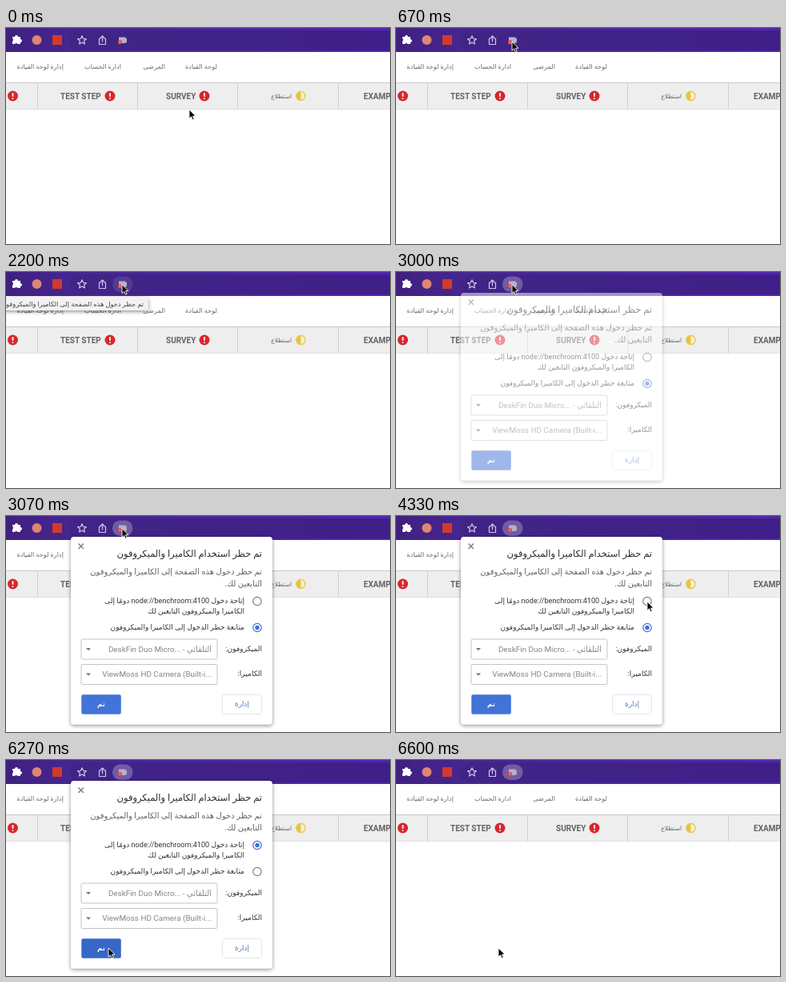
Recreate the animation shown at these times as an HTML page. Size 480 px wide and 270 px high, loop 6670 ms.

```html
<!DOCTYPE html>
<html lang="ar">
<head>
<meta charset="utf-8">
<style>
  html, body { margin: 0; width: 100%; height: 100%; overflow: hidden; background: #fff; }
  svg { display: block; width: 100vw; height: 100vh; }
  text { font: 9px Roboto, "DejaVu Sans", sans-serif; fill: #5f6368; }
  .rtl { direction: rtl; }
  .nav text { font-size: 8.2px; fill: #6a6a6a; }
  .tabs text { font-size: 10px; font-weight: 700; fill: #646464; }
  .tabs .rtl { font-size: 7.5px; font-weight: 400; }
  .title text { font-size: 11.5px; fill: #2b2c30; }
  .body text { font-size: 10px; }
  .dark text { font-size: 9.1px; fill: #35363a; }
  .choice text { font-size: 9.9px; fill: #858585; }
  .line { fill: none; stroke: #cfc4ec; stroke-width: 1.2; stroke-linejoin: round; stroke-linecap: round; }
  .box { fill: #fff; stroke: #c4c4c4; }
</style>
</head>
<body>
<svg viewBox="0 0 480 270">
  <defs>
    <linearGradient id="bar">
      <stop offset="0" stop-color="#40207e"/>
      <stop offset=".17" stop-color="#462690"/>
      <stop offset=".5" stop-color="#4c259f"/>
      <stop offset="1" stop-color="#5623b4"/>
    </linearGradient>
    <linearGradient id="field">
      <stop offset="0" stop-color="#402586"/>
      <stop offset="1" stop-color="#3f1f88"/>
    </linearGradient>
    <filter id="shadow" x="-10%" y="-20%" width="120%" height="150%">
      <feDropShadow dx="0" dy="1.5" stdDeviation="2.8" flood-opacity=".45"/>
    </filter>
    <g id="alert">
      <circle r="6.5" fill="#d9262c"/>
      <path d="M0-3.8V.8M0 2.6V4" stroke="#fff" stroke-width="1.8"/>
    </g>
  </defs>

  <rect width="480" height="270" fill="#fff"/>

  <!-- browser toolbar -->
  <rect width="480" height="30" fill="url(#bar)"/>
  <rect x="79" y="3" width="430" height="25" rx="12.5" fill="url(#field)"/>
  <path fill="#fff" d="M8 11h3a2 2 0 1 1 4 0h3v3a2 2 0 1 1 0 4v2h-3.5a2 2 0 0 0-3.5 0H8v-3.5a2 2 0 0 0 0-3.5z"/>
  <circle cx="38.5" cy="15" r="6" fill="#df8574"/>
  <rect x="58" y="9" width="12" height="12" fill="#d23a2c"/>
  <path class="line" d="M95 9.8l1.6 3.5 3.8.4-2.9 2.5.9 3.7-3.4-2-3.4 2 .9-3.7-2.9-2.5 3.8-.4z"/>
  <path class="line" d="M118.500 13h-2v7.500h8V13h-2M120.500 17V10m-2 2 2-2 2 2"/>
  <rect id="hover" x="133" y="5.5" width="25.5" height="19.5" rx="9.75" fill="#fff"/>
  <path fill="#b9b0c8" d="M141 11.500h8.500v2l1.500-1v6l-1.500-1v1.500H141z"/>
  <rect x="140" y="15.500" width="4.800" height="4.800" rx=".8" fill="#d63a42"/>
  <path d="M141.200 16.700l2.400 2.400m0-2.400-2.400 2.400" stroke="#f3d5da" stroke-width=".6"/>

  <!-- page navigation -->
  <g class="nav">
    <text class="rtl" x="264" y="51">لوحة القيادة</text>
    <text class="rtl" x="199" y="51">المرضى</text>
    <text class="rtl" x="144" y="51">ادارة الحساب</text>
    <text class="rtl" x="72" y="51">إدارة لوحة القيادة</text>
  </g>

  <!-- step tabs -->
  <g class="tabs">
    <rect y="68" width="480" height="34" fill="#eee"/>
    <path d="M0 68.5H480" stroke="#c8c8c8"/>
    <path d="M0 101.5H480" stroke="#e2e2e2"/>
    <path d="M39.5 69V102M164.5 69V102M289.5 69V102M415.5 69V102" stroke="#d0d0d0"/>
    <use href="#alert" x="8.5" y="85"/>
    <use href="#alert" x="130" y="85"/>
    <use href="#alert" x="248" y="85"/>
    <text x="68" y="88.5">TEST STEP</text>
    <text x="200" y="88.5">SURVEY</text>
    <text class="rtl" x="357" y="88">استطلاع</text>
    <text x="447" y="88.5">EXAMPLE</text>
    <circle cx="368.5" cy="85" r="5.6" fill="#f6eed2" stroke="#e8c33f" stroke-width="1.2"/>
    <path d="M368.5 79.4a5.6 5.6 0 0 0 0 11.2z" fill="#e8c33f"/>
  </g>

  <g id="tooltip">
    <rect x="-10" y="31" width="188" height="17" rx="4" fill="#f3f1f4" filter="url(#shadow)"/>
    <text class="rtl" x="172" y="43" style="font-size:8.3px;fill:#444">تم حظر دخول هذه الصفحة إلى الكاميرا والميكروفون</text>
  </g>

  <g id="popup">
    <rect x="81" y="26" width="252" height="234.5" rx="4" fill="#fff" filter="url(#shadow)"/>
    <path d="M90.5 34.5l6.500 6.500m0-6.500-6.500 6.500" stroke="#6f7378" stroke-width="1.2"/>
    <g class="title">
      <text class="rtl" x="320" y="51">تم حظر استخدام الكاميرا والميكروفون</text>
    </g>
    <g class="body">
      <text class="rtl" x="320" y="73">تم حظر دخول هذه الصفحة إلى الكاميرا والميكروفون</text>
      <text class="rtl" x="320" y="88">التابعين لك.</text>
    </g>
    <g class="dark">
      <text class="rtl" x="298" y="109">إتاحة دخول node://benchroom:4100 دومًا إلى</text>
      <text class="rtl" x="298" y="121.5">الكاميرا والميكروفون التابعين لك</text>
      <text class="rtl" x="298" y="142">متابعة حظر الدخول إلى الكاميرا والميكروفون</text>
      <text class="rtl" x="320" y="169">الميكروفون:</text>
      <text class="rtl" x="320" y="200">الكاميرا:</text>
    </g>
    <g class="radio"><circle cx="314" cy="106.5" r="5.2" fill="#fff"/><circle cx="314" cy="106.5" r="2.7"/></g>
    <g class="radio"><circle cx="314" cy="139.5" r="5.2" fill="#fff"/><circle cx="314" cy="139.5" r="2.7"/></g>
    <rect class="box" x="94" y="154" width="170" height="25" rx="1.5"/>
    <rect class="box" x="94" y="185.5" width="170" height="25" rx="1.5"/>
    <path d="M100 165h6l-3 3.3zM100 196.5h6l-3 3.3z" fill="#74777b"/>
    <g class="choice">
      <text class="rtl" x="257" y="169.5">التلقائي - DeskFin Duo Micro...&lrm;</text>
      <text x="257" y="201" text-anchor="end">ViewMoss HD Camera (Built-i...</text>
    </g>
    <rect id="done" x="94.3" y="223.3" width="49.5" height="24.5" rx="2"/>
    <text x="119" y="238" text-anchor="middle" style="font-size:8.5px;font-weight:700;fill:#fff">تم</text>
    <rect x="270.5" y="223.5" width="49" height="24" rx="2" fill="#fff" stroke="#e4e6ea"/>
    <text x="295" y="238" text-anchor="middle" style="fill:#5578c4">إدارة</text>
  </g>

  <path id="cursor" d="M0 0V11.2L2.6 8.8 4.3 12.7 6.2 11.9 4.5 8.1H8z" fill="#000" stroke="#fff" stroke-width=".9" stroke-linejoin="round"/>
</svg>

<script>
  const LOOP = 6670, TICKS_PER_MS = 0.015;
  const byId = id => document.getElementById(id);
  const [hover, tooltip, popup, done, cursor] =
    ['hover', 'tooltip', 'popup', 'done', 'cursor'].map(byId);
  const radios = [...document.querySelectorAll('.radio')];

  // Cursor stops: tick, x, y
  const stops = [
    [0, 229, 102], [10, 145, 17], [11, 145, 17], [14, 145, 15.5],
    [52, 145, 15.5], [59, 307, 101], [60, 307, 101], [65, 314, 107],
    [69, 314, 107], [74, 150, 229], [75, 150, 229], [76, 144, 234],
    [81, 128, 235], [101, 128, 235]
  ];

  const clamp = v => Math.max(0, Math.min(1, v));
  const ease = v => v * v * (3 - 2 * v);

  function cursorAt(tick) {
    const i = stops.findIndex(stop => stop[0] > tick);
    const [t0, x0, y0] = stops[i - 1], [t1, x1, y1] = stops[i];
    const k = ease((tick - t0) / (t1 - t0));
    return [x0 + (x1 - x0) * k, y0 + (y1 - y0) * k];
  }

  function setRadio(group, on) {
    const [ring, dot] = group.children;
    ring.setAttribute('stroke', on ? '#3f70d8' : '#7c7f84');
    ring.setAttribute('stroke-width', 1.2);
    dot.setAttribute('fill', on ? '#3f70d8' : 'none');
  }

  function draw(now) {
    const tick = Math.floor((now % LOOP) * TICKS_PER_MS + 0.1);
    const allowed = tick >= 68;
    hover.setAttribute('opacity', tick >= 45 ? 0.26 : 0.1 * clamp((tick - 11) / 3));
    tooltip.setAttribute('opacity', clamp((tick - 30) / 3) * clamp((42 - tick) / 3));
    popup.setAttribute('opacity', tick < 99 ? clamp((tick - 44) / 2) : 0);
    setRadio(radios[0], allowed);
    setRadio(radios[1], !allowed);
    done.setAttribute('fill', tick >= 93 && tick < 96 ? '#3767c8' : '#4273d9');
    cursor.setAttribute('transform', `translate(${cursorAt(tick)})`);
  }

  const start = performance.now();
  function loop() {
    draw(performance.now() - start);
    requestAnimationFrame(loop);
  }
  loop();
</script>
</body>
</html>
```
